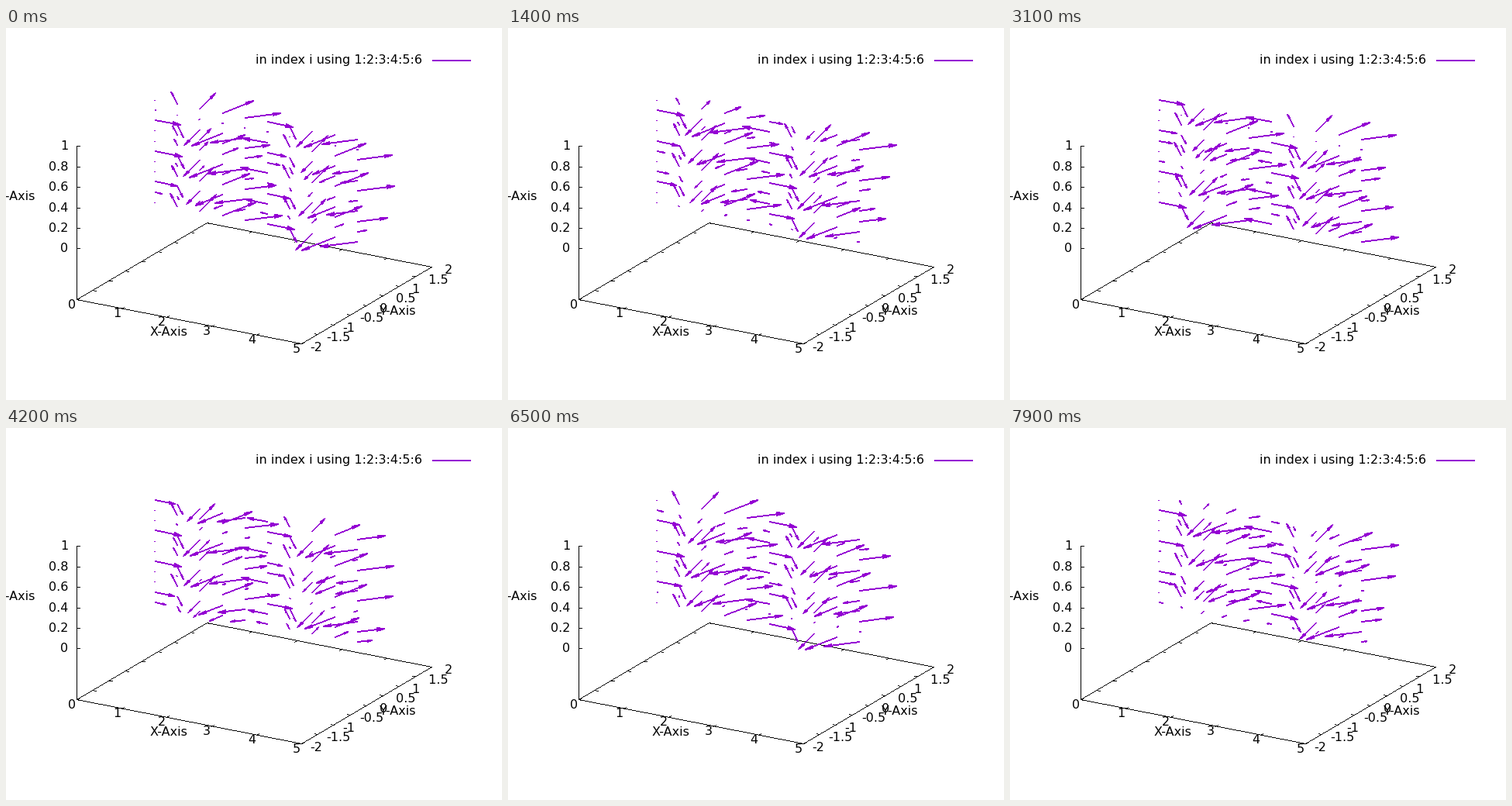
Recreate the animation shown at these times as a matplotlib script. Size 640 by 480 pixels, loop 8 s.

```python
import numpy as np
import matplotlib.pyplot as plt
from matplotlib.animation import FuncAnimation
from matplotlib.collections import PolyCollection

W, H, DPI = 640, 480, 100
PX = 72 / DPI
VIOLET = "#9400d3"
FRAMES, STEP_MS = 80, 100

# Screen directions of one unit along x, y and z
ORIGIN = np.array([91.2, 350.4])
EX = np.array([57.95, 11.4])
EY = np.array([42.0, -24.87])
EZ = np.array([0.0, -132.0])


def project(x, y, z=-0.5):
    x, y, z = (np.asarray(v, float)[..., None] for v in (x, y, z))
    return ORIGIN + x * EX + (y + 2) * EY + (z + 0.5) * EZ


def stair(p, q, width):
    """Outline of a hard-edged pixel line from p to q."""
    p, q = np.round(p), np.round(q)
    dx, dy = np.abs(q - p)
    steep = dy >= dx
    if steep:
        p, q = p[::-1], q[::-1]
    if p[0] > q[0]:
        p, q = q, p
    cols = np.arange(p[0], q[0] + 1)
    slope = (q[1] - p[1]) / max(q[0] - p[0], 1)
    rows = np.floor(p[1] + slope * (cols - p[0]) + 0.5) - width // 2
    u = np.stack([cols, cols + 1], axis=1).ravel()
    v = np.repeat(rows, 2)
    edge = np.stack([np.r_[u, u[::-1]], np.r_[v, v[::-1] + width]], axis=1)
    return edge[:, ::-1] if steep else edge


fig = plt.figure(figsize=(W / DPI, H / DPI), dpi=DPI, facecolor="white")
ax = fig.add_axes([0, 0, 1, 1])
ax.set_xlim(0, W)
ax.set_ylim(H, 0)
ax.axis("off")


def label(x, y, text, ha="center"):
    """Place text with its capitals centred on y."""
    ax.text(x, y + 6, text, ha=ha, va="baseline", color="black",
            family="DejaVu Sans", fontsize=16 * PX)


def add_polys(polys, color):
    shapes = PolyCollection(polys, facecolors=color, linewidths=0, snap=False)
    return ax.add_collection(shapes)


# Base, z axis and tics
corners = project([0, 5, 5, 0], [-2, -2, 2, 2])
lines = list(zip(corners, np.roll(corners, -1, axis=0)))
lines.append((corners[0], project(0, -2, 1)))


def tic(start, direction, size):
    lines.append((start, start + direction / np.hypot(*direction) * size))


for x in range(6):
    tic(project(x, -2), EY, 3.5)
    tic(project(x, 2), -EY, 3.5)
    label(85.3 + 57.9 * x, 355.5 + 11.42 * x, str(x))

for i in range(9):
    y = -2 + i / 2
    tic(project(0, y), EX, 4)
    tic(project(5, y), -EX, 4)
    label(392.5 + 21.1 * i, 410.7 - 12.45 * i,
          f"{y:g}" if y < 0 else f" {y:g}", "left")

for z in np.arange(6) / 5:
    p = project(0, -2, z)
    tic(p, np.array([1.0, 0.0]), 4)
    label(80, p[1] - 1, f"{z:g}", "right")

add_polys([stair(p, q, 1) for p, q in lines], "black")

label(210, 391, "X-Axis")
label(505, 364, "Y-Axis")
label(38, 216, "Z-Axis", "right")
label(537.5, 40, "in index i using 1:2:3:4:5:6", "right")
add_polys([stair((550, 42), (599, 42), 2)], VIOLET)

# Vector field on a grid of ten by eleven points
gx, gz = (g.ravel() for g in np.meshgrid(np.arange(10) / 2, np.arange(11) / 10))
tails = np.round(project(gx, 0.4, gz))
turn = 2 * np.pi * gx / 5
swing = (0.607 * np.cos(turn)[:, None] * EX
         - 0.80 * np.sin(turn)[:, None] * EY)
SPREAD = np.tan(np.radians(10))
arrows = add_polys([], VIOLET)


def arrow(tail, tip):
    """Shaft and two barbs; a vector without length is a dot."""
    polys = [stair(tail, tip, 2)]
    size = np.hypot(*(tip - tail))
    if size > 0:
        u = (tip - tail) / size
        head = np.clip(0.3 * size, 1.5, 10)
        side = np.array([-u[1], u[0]]) * SPREAD
        polys += [stair(tip - head * (u + s * side), tip, 2) for s in (1, -1)]
    return polys


def draw(frame):
    t = frame * STEP_MS / 1000
    wave = np.cos(19.28 * gz - 3.24 - t)
    # Vectors leaving the x range shrink to a dot
    wave = np.where((gx == 0) & (wave < 0), 0, wave)
    tips = np.round(tails + wave[:, None] * swing)
    arrows.set_verts([poly for pair in zip(tails, tips)
                      for poly in arrow(*pair)])
    return arrows,


anim = FuncAnimation(fig, draw, frames=FRAMES, interval=STEP_MS,
                     repeat=True, repeat_delay=0, blit=False)
plt.show()
```
